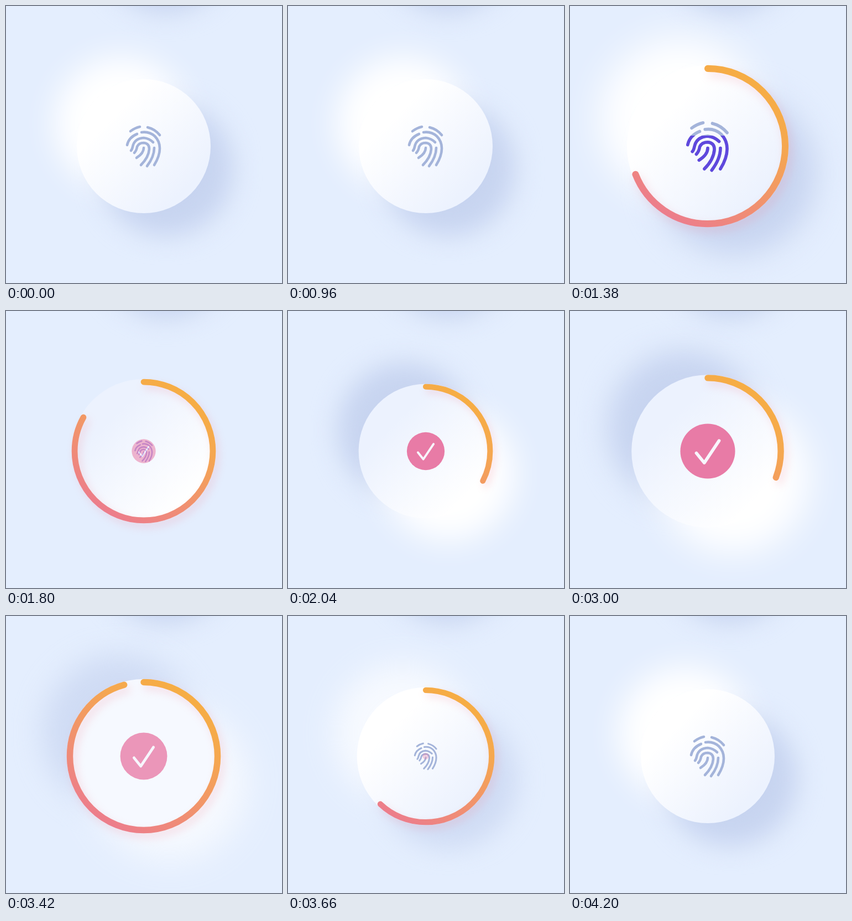
An HTML page for the animation above (5040 ms loop, 499 by 500 pixels).

```html
<!DOCTYPE html>
<html lang="en">
<head>
<meta charset="utf-8">
<title>Fingerprint button</title>
<style>
  html, body { margin: 0; width: 100%; height: 100%; overflow: hidden; background: #e4eefe; }
  svg { display: block; width: 100%; height: 100%; }
  .line { fill: none; stroke-linecap: round; stroke-linejoin: round; }
</style>
</head>
<body>
<svg viewBox="0 0 499 500">
  <defs>
    <filter id="soft" x="-60%" y="-60%" width="220%" height="220%" color-interpolation-filters="sRGB">
      <feGaussianBlur stdDeviation="23"/>
    </filter>
    <filter id="softer" x="-80%" y="-80%" width="260%" height="260%" color-interpolation-filters="sRGB">
      <feGaussianBlur stdDeviation="28"/>
    </filter>
    <filter id="glowBlur" filterUnits="userSpaceOnUse" x="-180" y="-180" width="360" height="360" color-interpolation-filters="sRGB">
      <feGaussianBlur stdDeviation="7"/>
    </filter>
    <linearGradient id="face" x1=".15" y1=".15" x2=".85" y2=".85">
      <stop id="faceA" offset=".18"/>
      <stop id="faceB" offset=".95"/>
    </linearGradient>
    <linearGradient id="warm" gradientUnits="userSpaceOnUse" x1="80" y1="-90" x2="-50" y2="116">
      <stop offset="0" stop-color="#f6ad44"/>
      <stop offset=".25" stop-color="#f5a750"/>
      <stop offset="1" stop-color="#ec7c8d"/>
    </linearGradient>
    <circle id="dark" r="121" fill="#c7d4f0" filter="url(#soft)"/>
    <circle id="light" r="121" fill="#fff" filter="url(#softer)"/>
    <g id="print" class="line" stroke-width="4.6">
      <path d="M-24,-27Q-16,-33 -7,-35"/>
      <path d="M7,-34Q20,-31 29,-20"/>
      <path d="M-30,-2Q-27,-16 -12,-22"/>
      <path d="M-4,-25Q10,-27 20,-18Q29,-9 29,4Q29,18 19,34"/>
      <path d="M-23,8Q-21,6 -20,1Q-17,-14 0,-15Q10,-14 17,-7"/>
      <path d="M19,3Q19,19 6,36"/>
      <path d="M-17,12Q-13,8 -12,1Q-9,-6 0,-6Q10,-5 10,5Q9,20 -5,34"/>
      <path d="M0,3Q0,13 -13,21"/>
    </g>
    <clipPath id="fill"><rect id="fillBox" x="-50" width="100" height="120"/></clipPath>
  </defs>

  <use href="#dark" x="289" y="-109"/>
  <g id="button">
    <g id="raised"><use href="#light" x="-41" y="-41"/><use href="#dark" x="41" y="41"/></g>
    <g id="sunken"><use href="#dark" x="-38" y="-38"/><use href="#light" x="41" y="41"/></g>
    <circle r="121" fill="url(#face)"/>
    <g id="ring" fill="none" stroke-width="10" stroke-linecap="round">
      <g filter="url(#glowBlur)" opacity=".26">
        <path class="arc" transform="translate(5 7)" stroke="#f08a9c" pathLength="1" d="M0,-116A116,116 0 1 1 0,116A116,116 0 1 1 0,-116"/>
      </g>
      <path class="arc" stroke="url(#warm)" pathLength="1" d="M0,-116A116,116 0 1 1 0,116A116,116 0 1 1 0,-116"/>
    </g>
    <g id="finger">
      <use href="#print" stroke="#a4b4da"/>
      <g clip-path="url(#fill)"><use href="#print" stroke="#5f48dd"/></g>
    </g>
    <g id="done">
      <circle r="43.5" fill="#e87ba6"/>
      <path class="line" d="M-18,3L-5.5,18.5L18,-16.5" stroke="#f8f6fd" stroke-width="5"/>
    </g>
  </g>
</svg>
<script>
  const LOOP = 5040, STEP = 60, PRESS = 480;
  const STARTS = [1080, 2820];
  const el = id => document.getElementById(id);
  const arcs = document.querySelectorAll('.arc');

  const clamp = x => Math.min(1, Math.max(0, x));
  const sine = x => (1 - Math.cos(Math.PI * clamp(x))) / 2;
  const outSine = x => Math.sin(Math.PI / 2 * clamp(x));
  const inQuad = x => clamp(x) ** 2;
  const outQuad = x => 1 - (1 - clamp(x)) ** 2;

  const mix = (a, b, k) => `rgb(${a.map((v, i) => Math.round(v + (b[i] - v) * k))})`;
  const WHITE = [255, 255, 255], PALE = [236, 242, 254];

  function setIcon(node, scale, opacity) {
    node.setAttribute('transform', `scale(${Math.max(scale, 0.001)})`);
    node.setAttribute('opacity', opacity);
  }

  function draw(t) {
    const second = t >= STARTS[1];
    const press = t - STARTS[second ? 1 : 0];
    const after = press - PRESS;
    const released = after > 0;

    const progress = released ? 1 - inQuad(after / 585) : sine(press / PRESS);
    const grow = released ? 1 - outQuad(after / 540) : outSine(press / PRESS);
    el('button').setAttribute('transform', `translate(249 253) scale(${1 + 0.25 * grow})`);

    el('ring').style.display = progress > 0.002 ? '' : 'none';
    arcs.forEach(a => a.setAttribute('stroke-dasharray', `${progress} 2`));

    // Light direction: 1 = raised, -1 = sunken
    const sign = second ? -1 : 1;
    const side = sign * Math.cos(Math.PI * clamp(after / 480));
    el('raised').setAttribute('opacity', Math.max(0, side));
    el('sunken').setAttribute('opacity', Math.max(0, -side));

    const turn = sine(after / 240);
    const flip = second ? 1 - turn : turn;
    el('faceA').setAttribute('stop-color', mix(WHITE, PALE, flip));
    el('faceB').setAttribute('stop-color', mix(PALE, WHITE, flip));

    const filled = second ? 0 : released ? 1 : progress;
    el('fillBox').setAttribute('y', 41 - 82 * filled);

    const [from, to] = second ? ['done', 'finger'] : ['finger', 'done'];
    setIcon(el(from), 1 - sine(after / 470), 1 - clamp(after / 560));
    setIcon(el(to), outQuad(after / 900), clamp((after - 110) / 240));
    el(from).style.display = after < 470 ? '' : 'none';
    el(to).style.display = after > 110 ? '' : 'none';
  }

  function tick() {
    const t = performance.now() % LOOP;
    draw(Math.floor(t / STEP) * STEP);
    requestAnimationFrame(tick);
  }
  tick();
</script>
</body>
</html>
```
